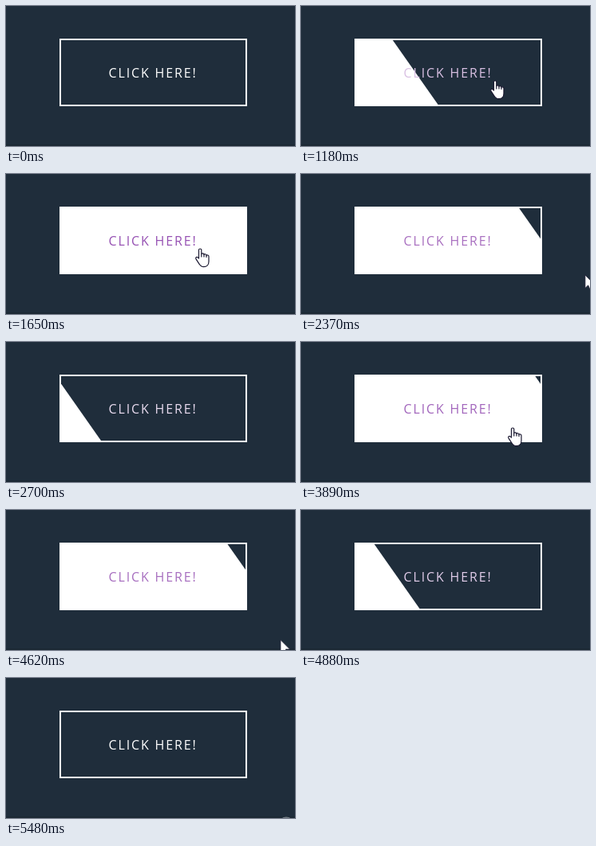
Write an HTML page that moves like this. It is 362 px wide and 176 px high and loops after 5.54 s.

```html
<!DOCTYPE html>
<html lang="en">
<head>
<meta charset="utf-8">
<title>Button hover</title>
<style>
  html, body { margin: 0; width: 100%; height: 100%; overflow: hidden; background: #1f2d3b; }
  svg { display: block; width: 100vw; height: 100vh; }
  text { font: 400 16px "Open Sans", "Noto Sans", sans-serif; letter-spacing: 1.85px; }
</style>
</head>
<body>
<svg viewBox="0 0 362 176">
  <defs>
    <clipPath id="inner"><rect x="69" y="43" width="231" height="81"/></clipPath>
  </defs>
  <rect width="362" height="176" fill="#1f2d3b"/>
  <rect y="174" width="362" height="2" fill="#1b2834"/>
  <rect x="68" y="42" width="233" height="83" fill="none" stroke="#fff" stroke-width="2"/>
  <g clip-path="url(#inner)"><path id="fill" fill="#fff"/></g>
  <text id="label" x="128.6" y="90">CLICK HERE!</text>
  <ellipse id="spot" cx="351" cy="177" rx="5" ry="2.5" fill="#717b84"/>
  <g id="mouse" fill="#fff" stroke="#1a1830" stroke-linejoin="round">
    <path id="arrow" stroke-width=".8" d="M0 0V16.5L3.8 12.9 6.3 18.6 8.9 17.5 6.4 11.8H11.7Z"/>
    <g id="hand" transform="translate(-5 .5)" stroke-width="1.2">
      <path d="M4.5 2C4.5 0 7.8 0 7.8 2V7C8.4 6 10.8 6.2 11 7.6C11.6 6.8 13.8 7.2 14 8.6C14.8 8 17 8.4 17 10.2V16.5C17 20.5 14.5 23.2 10.8 23.2C7.8 23.2 6.4 22 5.2 19.8L1 13.4C0 11.6 1.8 10.2 3.2 11.4L4.5 12.6Z"/>
      <path fill="none" d="M7.8 7V11M11 7.6V11M14 8.6V11.5"/>
    </g>
  </g>
</svg>
<script>
const LOOP = 5540, START = 390, STEP = 66.08, FADE = 1000;
const PURPLE = [142, 68, 173];
const hovers = [[965, 2199], [3375, 4451]];

// straight pointer moves, each starting where the last one ended
const home = { x: 343, y: 180 };
const moves = [
  { from: 340, to: 590, x: 350, y: 142 },
  { from: 850, to: 1150, x: 242, y: 93 },
  { from: 2060, to: 2400, x: 366, y: 130 },
  { from: 3295, to: 3296, x: 333, y: 138 },
  { from: 3296, to: 3560, x: 264, y: 107 },
  { from: 4425, to: 4680, x: 369, y: 181 }
];

const $ = id => document.getElementById(id);
const mix = (a, b, k) => a + (b - a) * k;
const clamp = k => Math.min(1, Math.max(0, k));
const show = (id, on) => $(id).setAttribute("visibility", on ? "visible" : "hidden");

// CSS "ease": cubic-bezier(.25, .1, .25, 1)
function ease(x) {
  if (x <= 0) return 0;
  if (x >= 1) return 1;
  const curve = (a, b, s) => 3 * a * s * (1 - s) ** 2 + 3 * b * s * s * (1 - s) + s ** 3;
  let lo = 0, hi = 1;
  for (let i = 0; i < 24; i++) {
    const mid = (lo + hi) / 2;
    if (curve(.25, .25, mid) < x) lo = mid; else hi = mid;
  }
  return curve(.1, 1, lo);
}

function pointer(t) {
  return moves.reduce((at, m) => {
    const k = clamp((t - m.from) / (m.to - m.from));
    return { x: mix(at.x, m.x, k), y: mix(at.y, m.y, k) };
  }, home);
}

function draw(time) {
  // the picture advances about 15 times a second
  const n = Math.floor((time - START + 6) / STEP);
  const t = n < 0 ? 0 : START + n * STEP;

  const p = hovers.reduce((sum, [on, off]) =>
    sum + ease((t - on) / FADE) - ease((t - off) / FADE), 0);

  // a bar skewed by 35 degrees, widening to 160% of the button
  const slant = 81 * Math.tan(35 * Math.PI / 180);
  const foot = 69 - 50 + slant / 2 + 231 * 1.6 * p;
  $("fill").setAttribute("d", p > 0 ? `M0 43H${foot - slant}L${foot} 124H0Z` : "");
  $("label").setAttribute("fill", `rgb(${PURPLE.map(c => Math.round(mix(255, c, p)))})`);

  const { x, y } = pointer(t);
  const over = hovers.some(([on, off]) => t >= on && t < off);
  $("mouse").setAttribute("transform", `translate(${x.toFixed(1)} ${y.toFixed(1)})`);
  show("arrow", !over);
  show("hand", over);
  show("spot", t > 5450);
}

function tick() {
  draw(performance.now() % LOOP);
  requestAnimationFrame(tick);
}
tick();
</script>
</body>
</html>
```
